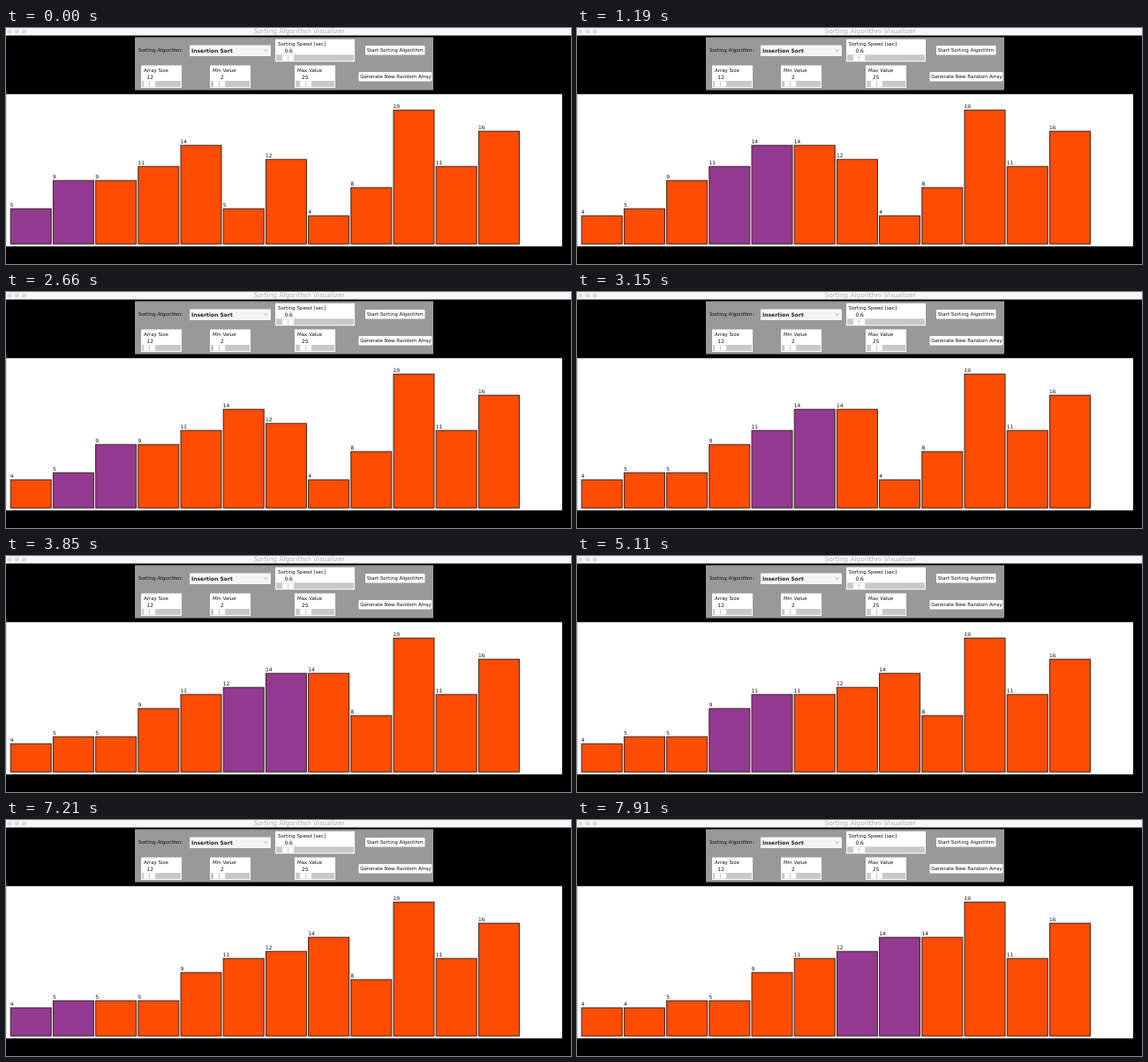
These frames come from a looping animation (640 px wide and 268 px high, 8000 ms). An HTML page:

```html
<!DOCTYPE html>
<html lang="en">
<head>
<meta charset="utf-8">
<title>Sorting Algorithm Visualizer</title>
<style>
  html, body { margin: 0; width: 100%; height: 100%; overflow: hidden; background: #000; }
  svg { display: block; width: 640px; height: 268px; }
  text { font: 5.5px "DejaVu Sans", sans-serif; fill: #111; white-space: pre; }
  .title { font-size: 7.4px; fill: #b4b4b4; text-anchor: middle; }
  .choice { font-weight: bold; font-size: 6px; fill: #222; }
  .value { font-size: 5.9px; }
  .bar { stroke: #3a2420; stroke-width: 1; }
</style>
</head>
<body>
<svg id="stage" viewBox="0 0 640 268"></svg>
<script>
const stage = document.getElementById('stage');

function add(tag, attrs, text) {
  const el = document.createElementNS('http://www.w3.org/2000/svg', tag);
  for (const key in attrs) el.setAttribute(key, attrs[key]);
  if (text) el.textContent = text;
  return stage.appendChild(el);
}
const box = (x, y, width, height, fill, more) => add('rect', { x, y, width, height, fill, ...more });
const label = (x, y, text, cls = '') => add('text', { x, y, class: cls }, text);

function slider(x, y, width, name, value, valueX, knobX) {
  box(x, y, width, 25.5, '#fff');
  label(x + 3, y + 7.6, name);
  label(valueX, y + 15.6, value, 'value');
  box(x + 1, y + 17.5, width - 2, 7, '#c9c9c9');
  box(knobX, y + 17.8, 13, 6.4, '#fff');
  box(knobX + 6, y + 18, 0.7, 6, '#b5b5b5');
}

function button(x, y, width, name) {
  box(x, y, width, 10.5, '#fff', { rx: 1 });
  label(x + 1.7, y + 7.4, name);
}

// Window and controls
box(0, 0, 640, 8.5, '#f7f7f7');
for (const cx of [4, 12.2, 20.4]) add('circle', { cx, cy: 4, r: 2.8, fill: '#dedede' });
label(332, 6.4, 'Sorting Algorithm Visualizer', 'title');
box(146, 10.5, 338, 60, '#999');
label(150, 27.4, 'Sorting Algorithm:');
box(208, 19.5, 92, 12.5, '#f5f5f5', { rx: 1 });
label(210, 28, 'Insertion Sort', 'choice');
add('path', { d: 'M292.5 24.5l2 1.8 2-1.8', fill: 'none', stroke: '#888', 'stroke-width': 0.7 });
slider(305, 12.8, 90, 'Sorting Speed [sec]', '0.6', 315.5, 313);
slider(153, 42.5, 46, 'Array Size', '12', 159.5, 156);
slider(231, 42.5, 46, 'Min Value', '2', 243, 235);
slider(327, 42.5, 46, 'Max Value', '25', 335, 333);
button(407, 20, 67.5, 'Start Sorting Algorithm');
button(399.5, 50, 83, 'Generate New Random Array');
box(0, 75, 630, 173, '#fff');
add('path', { d: 'M.4 248V75.4H630', fill: 'none', stroke: '#bbb', 'stroke-width': 0.8 });

// One snapshot per shift of the insertion sort
function insertionSteps(data) {
  const steps = [];
  for (let i = 1; i < data.length; i++) {
    const key = data[i];
    let j = i - 1;
    while (j >= 0 && key < data[j]) {
      data[j + 1] = data[j];
      j--;
      steps.push({ values: [...data], j });
    }
    data[j + 1] = key;
  }
  return steps;
}

const LOOP = 8000, TICK = 70, PERIOD = 675, FIRST = 195, BASE = 245.2;
const steps = insertionSteps([5, 9, 11, 14, 4, 5, 12, 4, 8, 19, 11, 16]).slice(2);
const bars = steps[0].values.map((_, i) => {
  const x = 5.2 + 48.2 * i;
  return { rect: box(x, 0, 46, 0, '', { class: 'bar' }), text: label(x - 0.4, 0, '', 'value') };
});

let shown = -1;
function draw(now) {
  const time = Math.floor(now % LOOP / TICK) * TICK;
  const index = Math.floor((time - FIRST) / PERIOD) + 1;
  if (index !== shown) {
    shown = index;
    const { values, j } = steps[index];
    bars.forEach(({ rect, text }, i) => {
      const height = 8 * values[i];
      rect.setAttribute('y', BASE - height);
      rect.setAttribute('height', height);
      rect.setAttribute('fill', i === j || i === j + 1 ? '#933a90' : '#fe4c00');
      text.setAttribute('y', BASE - height - 2);
      text.textContent = values[i];
    });
  }
  requestAnimationFrame(draw);
}
draw(0);
</script>
</body>
</html>
```
